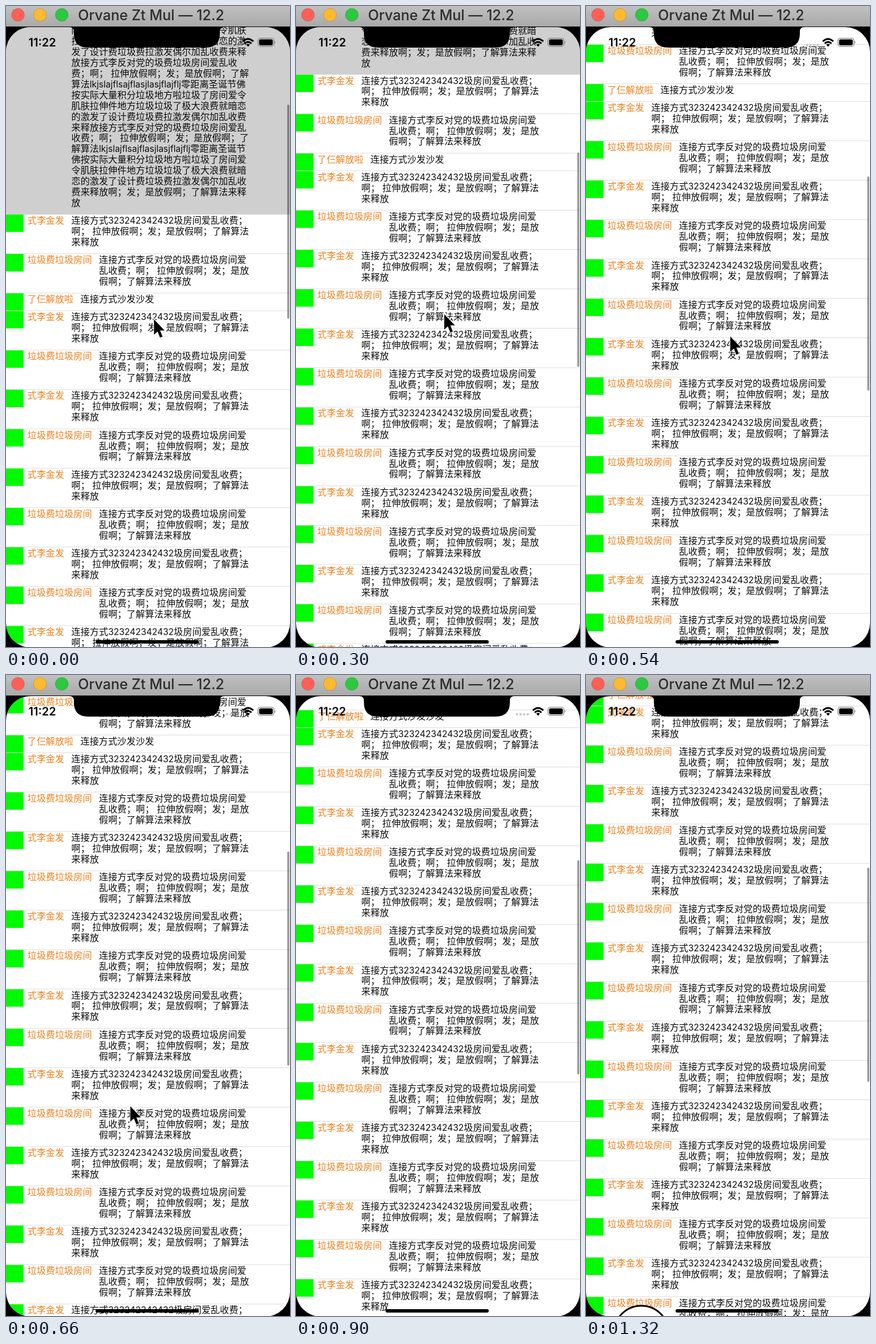
Animation, 498 px wide and 1125 px high, one loop 1380 ms. Source, as an HTML page:

```html
<!DOCTYPE html>
<html lang="zh-CN">
<head>
<meta charset="utf-8">
<title>Simulator list</title>
<style>
  html, body { margin: 0; width: 100%; height: 100%; overflow: hidden; background: #000; }
  svg { display: block; width: 498px; height: 1125px; }
  text { font-family: Inter, "Noto Sans CJK SC", "Noto Sans CJK", sans-serif; }
  #list text { font-size: 16.16px; fill: #0c0c0c; }
  #list .latin { font-size: 15.5px; }
  #list .name { fill: #ee7f1a; }
</style>
</head>
<body>
<svg viewBox="0 0 498 1125">
  <defs>
    <linearGradient id="bar" x2="0" y2="1">
      <stop stop-color="#c0c0c0"/><stop offset="1" stop-color="#a9a9a9"/>
    </linearGradient>
    <clipPath id="screen"><rect y="37" width="498" height="1089" rx="43.5"/></clipPath>
  </defs>
  <rect width="498" height="1125"/>
  <rect width="498" height="36" fill="url(#bar)"/>
  <g stroke-opacity=".15" stroke="#000">
    <circle cx="21" cy="15.5" r="11.3" fill="#ff5f57"/>
    <circle cx="59.5" cy="15.5" r="11.3" fill="#fdb92f"/>
    <circle cx="97.8" cy="15.5" r="11.3" fill="#2bc840"/>
  </g>
  <text x="254.5" y="25" font-size="25" font-weight="500" fill="#2c2c2c" text-anchor="middle">Orvane Zt Mul — 12.2</text>

  <g clip-path="url(#screen)">
    <rect y="36" width="498" height="1100" fill="#fff"/>
    <g id="list"></g>
    <rect id="thumb" x="493.2" width="3.6" height="376" rx="1.8" fill-opacity=".4"/>
    <text x="39.5" y="71" font-size="20" font-weight="600">11:22</text>
    <g fill-opacity=".2">
      <circle cx="387.5" cy="69" r="2.3"/><circle cx="393.8" cy="69" r="2.3"/>
      <circle cx="400" cy="69" r="2.3"/><circle cx="406.2" cy="69" r="2.3"/>
    </g>
    <g fill="none" stroke="#000" stroke-width="3">
      <path d="M415.3 62.2Q424.5 53.6 433.7 62.2"/>
      <path d="M418.6 65.8Q424.5 60.4 430.4 65.8"/>
    </g>
    <path d="M421.3 67.8Q424.5 65.2 427.7 67.8L424.5 71.4Z"/>
    <rect x="441.8" y="56.5" width="28" height="14.4" rx="4.2" fill="none" stroke="#777" stroke-width="1.2"/>
    <rect x="443.8" y="58.5" width="24" height="10.4" rx="2.6"/>
    <path d="M471.2 61.2Q473.6 63.7 471.2 66.2Z" fill="#777"/>
    <rect x="157" y="1113" width="181" height="6" rx="3"/>
  </g>
  <path d="M111 36V37Q119 37 119 45V48Q119 73 144 73H350Q375 73 375 48V45Q375 37 383 37V36Z"/>

  <circle id="ring" cx="97" cy="1155" r="48" fill="#fff" stroke="#000" stroke-width="3"/>
  <path id="cursor" d="M0 0V27L6.2 21.2L10.6 32L15 30.2L10.7 19.6H18.6Z" stroke="#fff" stroke-width="2.2" paint-order="stroke"/>
</svg>
<script>
const STEP = 60, STEPS = 23;
const ROW = 69.12, SHORT_ROW = 31, LINE = 18.93;
const START_Y = 366, TRAVEL = 500;

const $ = id => document.getElementById(id);
const list = $('list');

const intro = [
  '际大量积分垃圾地方啦垃圾了房间爱令肌肤',
  '拉伸件地方垃圾垃圾了极大浪费就暗恋的激',
  '发了设计费垃圾费拉激发偶尔加乱收费来释',
  '放接方式李反对党的圾费垃圾房间爱乱收',
  '费；啊； 拉伸放假啊；发；是放假啊；了解',
  '算法lkjslajflsajflasjlasjflajflj零距离圣诞节佛',
  '按实际大量积分垃圾地方啦垃圾了房间爱令',
  '肌肤拉伸件地方垃圾垃圾了极大浪费就暗恋',
  '的激发了设计费垃圾费拉激发偶尔加乱收费',
  '来释放接方式李反对党的圾费垃圾房间爱乱',
  '收费；啊； 拉伸放假啊；发；是放假啊；了',
  '解算法lkjslajflsajflasjlasjflajflj零距离圣诞节',
  '佛按实际大量积分垃圾地方啦垃圾了房间爱',
  '令肌肤拉伸件地方垃圾垃圾了极大浪费就暗',
  '恋的激发了设计费垃圾费拉激发偶尔加乱收',
  '费来释放啊；发；是放假啊；了解算法来释',
  '放'
];

const numbered = { name: '式李金发', x: 114.5, height: ROW, lines: [
  '连接方式323242342432圾房间爱乱收费；',
  '啊； 拉伸放假啊；发；是放假啊；了解算法',
  '来释放'] };
const plain = { name: '垃圾费垃圾房间', x: 163, height: ROW, lines: [
  '连接方式李反对党的圾费垃圾房间爱',
  '乱收费；啊； 拉伸放假啊；发；是放',
  '假啊；了解算法来释放'] };
const brief = { name: '了仨解放啦', x: 130.5, height: SHORT_ROW, lines: ['连接方式沙发沙发'] };

function add(parent, tag, attrs, content = '') {
  const el = document.createElementNS('http://www.w3.org/2000/svg', tag);
  for (const key in attrs) el.setAttribute(key, attrs[key]);
  el.textContent = content;
  parent.append(el);
  return el;
}

// Latin runs are set slightly smaller than the Chinese text around them.
function addLine(line, x, y) {
  const text = add(list, 'text', { x, y });
  for (const run of line.split(/([a-z0-9]+)/)) {
    if (/^[a-z0-9]/.test(run)) add(text, 'tspan', { class: 'latin' }, run);
    else text.append(run);
  }
}

function addLines(lines, x, y) {
  lines.forEach((line, i) => addLine(line, x, y + i * LINE));
}

function build() {
  add(list, 'rect', { y: -400, width: 498, height: 400, fill: '#cfcfcf' });
  addLines(intro, 114.5, -15 - (intro.length - 1) * LINE);
  const rows = [numbered, plain, brief];
  while (rows.length < 20) rows.push(rows.length % 2 ? numbered : plain);
  let y = 0;
  for (const row of rows) {
    add(list, 'rect', { y, width: 30.8, height: 30.6, fill: '#00fa00' });
    add(list, 'text', { x: 37.5, y: y + 16, class: 'name' }, row.name);
    addLines(row.lines, row.x, y + 16);
    y += row.height;
    add(list, 'rect', { y: y - 1, width: 498, height: 1, fill: '#dcdcdc' });
  }
}

// [ms, distance still to scroll]
const remaining = [[0, 500], [120, 382], [300, 254.5], [540, 132.8],
  [780, 77.7], [1080, 36.7], [1320, 19.5]];
// [ms, x, y]
const pointer = [[0, 259.5, 550], [120, 260, 541], [420, 260, 541],
  [540, 253, 580], [780, 183, 934], [900, 140, 1150]];

function sample(keys, t, col, mix) {
  let i = 1;
  while (i < keys.length - 1 && t > keys[i][0]) i++;
  const a = keys[i - 1], b = keys[i];
  const p = Math.min(1, (t - a[0]) / (b[0] - a[0]));
  return mix(a[col], b[col], p);
}
const linear = (a, b, p) => a + (b - a) * p;
const decay = (a, b, p) => a * (b / a) ** p;

function draw(t) {
  const scrolled = TRAVEL - sample(remaining, t, 1, decay);
  list.setAttribute('transform', `translate(0 ${START_Y - scrolled})`);
  $('thumb').setAttribute('y', 173 + scrolled * 0.3434);
  const x = sample(pointer, t, 1, linear), y = sample(pointer, t, 2, linear);
  $('cursor').setAttribute('transform', `translate(${x} ${y})`);
  $('ring').setAttribute('visibility', t >= 1320 ? 'visible' : 'hidden');
}

build();
const start = performance.now();
function tick() {
  const elapsed = Math.max(0, performance.now() - start);
  draw(Math.floor(elapsed / STEP) % STEPS * STEP);
  requestAnimationFrame(tick);
}
tick();
</script>
</body>
</html>
```
